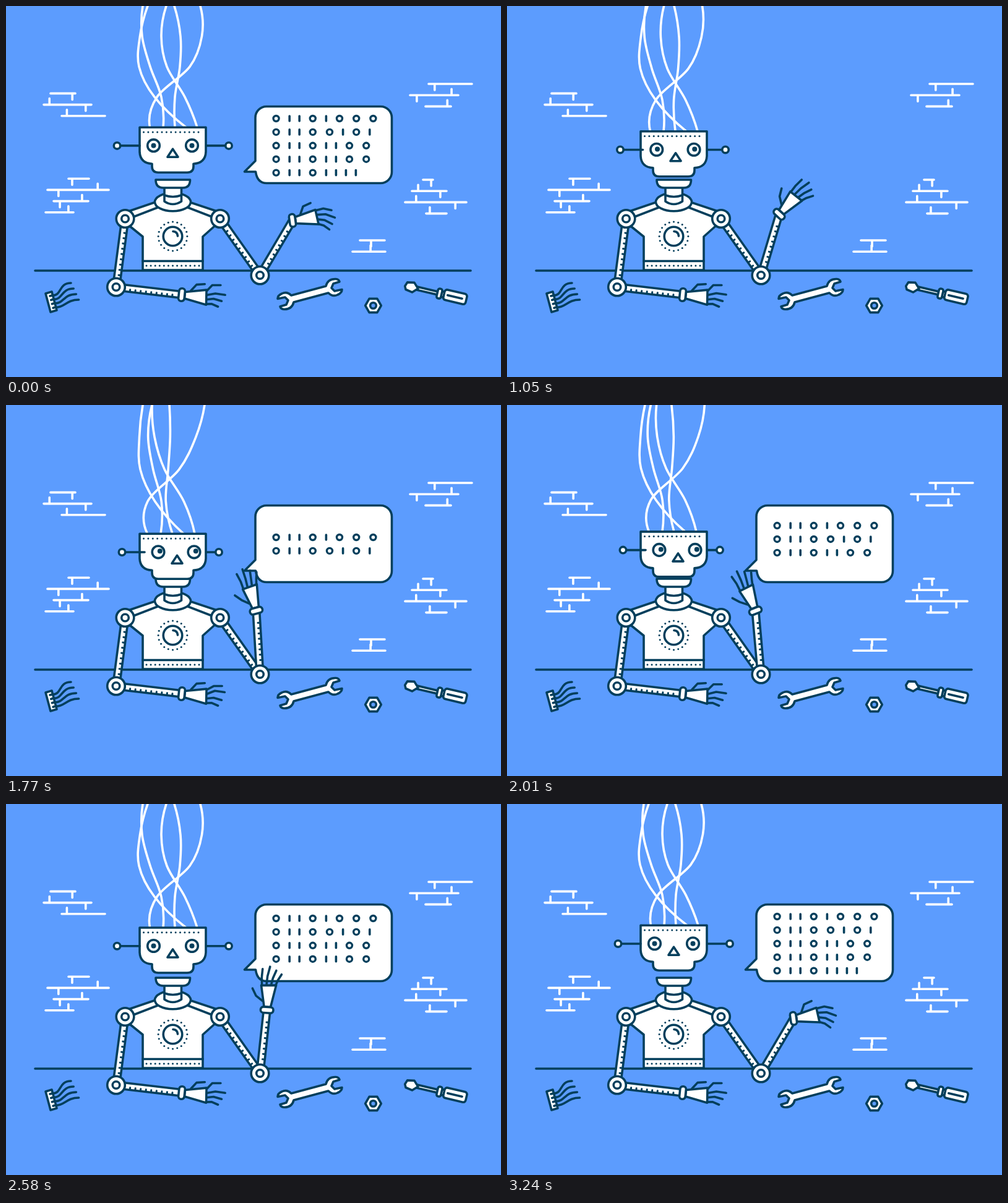
Recreate the animation shown at these times as an HTML page with a canvas. Size 800x600 px, loop 3.27 s.

```html
<!DOCTYPE html>
<html lang="en">
<head>
<meta charset="utf-8">
<title>Talking robot</title>
<style>
html, body { margin: 0; width: 100%; height: 100%; overflow: hidden; background: #5c9cfe; }
canvas { display: block; width: 800px; height: 600px; }
</style>
</head>
<body>
<canvas id="stage" width="800" height="600"></canvas>
<script>
const ctx = document.getElementById('stage').getContext('2d');
const LOOP = 3270, SKY = '#5c9cfe', INK = '#043f5c', PAPER = '#fff', LINE = 3.6;
const TAU = Math.PI * 2, RAD = Math.PI / 180;
const mix = (a, b, k) => a + (b - a) * k;
const range = n => [...Array(n).keys()];

// Smooth monotone curve through [time, value] keys.
function track(t, ...keys) {
  const last = keys.length - 1;
  if (t <= keys[0][0]) return keys[0][1];
  if (t >= keys[last][0]) return keys[last][1];
  const i = keys.findIndex(k => k[0] >= t) - 1;
  const rate = j => (keys[j + 1][1] - keys[j][1]) / (keys[j + 1][0] - keys[j][0]);
  const slope = j => {
    if (j === 0 || j === last) return 0;
    const a = rate(j - 1), b = rate(j);
    return a * b <= 0 ? 0 : 2 * a * b / (a + b);
  };
  const span = keys[i + 1][0] - keys[i][0], u = (t - keys[i][0]) / span, v = 1 - u;
  return keys[i][1] * (1 + 2 * u) * v * v + keys[i + 1][1] * (3 - 2 * u) * u * u +
    span * u * v * (slope(i) * v - slope(i + 1) * u);
}

function paint(path, fill = PAPER, stroke = INK, width = LINE) {
  ctx.lineWidth = width;
  if (fill) { ctx.fillStyle = fill; ctx.fill(path); }
  if (stroke) { ctx.strokeStyle = stroke; ctx.stroke(path); }
}
const shape = (d, fill, stroke) => paint(new Path2D(d), fill, stroke);
const lines = (d, color = INK, width = LINE) => paint(new Path2D(d), null, color, width);
function circle(x, y, r, fill, stroke, width) {
  const p = new Path2D();
  p.arc(x, y, r, 0, TAU);
  paint(p, fill, stroke, width);
}
const dot = (x, y, r = 1.5) => circle(x, y, r, INK, null);
const dotRow = (from, to, y, n) => range(n).forEach(i => dot(mix(from, to, i / (n - 1)), y));
function box(x, y, w, h, r = 0) {
  const p = new Path2D();
  p.roundRect(x, y, w, h, r);
  paint(p);
}
function polygon(points) {
  shape('M' + points.map(p => p.join(' ')).join('L') + 'Z');
}
function placed(x, y, angle, draw) {
  ctx.save();
  ctx.translate(x, y);
  ctx.rotate(angle);
  draw();
  ctx.restore();
}

// Courses are [start, end]; one joint rises at the given share of the length, one hangs opposite.
function bricks(y, joint, ...courses) {
  courses.forEach(([from, to], i) => {
    const level = y + i * 18.2;
    let d = `M${from} ${level}H${to}`;
    if (i > 0) d += `M${mix(from, to, joint)} ${level}v-10`;
    if (i < courses.length - 1) d += `M${mix(to, from, joint)} ${level}v10`;
    lines(d, PAPER);
  });
}
function drawWall() {
  bricks(141.4, .12, [72, 112], [61, 138], [90, 160]);
  bricks(126, .86, [683, 753], [653, 731], [678, 719]);
  bricks(279.2, .82, [101, 134], [67, 166], [77, 133], [64, 109]);
  bricks(281, .18, [674, 690], [656, 712], [645, 744], [679, 712]);
  bricks(379, .55, [572, 612], [560, 613]);
}

function drawTools() {
  shape('M64 465L74 462L82 492L72 495Z');
  for (const i of range(4)) {
    const x = 76 + i * 1.7, y = 468 + i * 6.4, tipX = 105 + i * 4.2, tipY = 448 + i * 9;
    lines(`M${x - 5} ${y + 1}l3 -.8M${x} ${y}C${x + 14} ${y} ${tipX - 20} ${tipY} ${tipX} ${tipY}`);
  }

  placed(491, 466, 0, () => {
    const jaw = 'Q29 -25 42 -24.5Q47 -24 48 -20L38 -17L35 -10L40 -5L52 -7.500Q52 -2 45 1Q37 5 30 -2';
    const turned = jaw.replace(/-?[\d.]+/g, n => -n);
    shape('M26 -13' + jaw + 'L-26 13' + turned + 'Z');
  });

  polygon(range(6).map(i => [593.5 + 12.8 * Math.cos(i * TAU / 6), 484.5 + 12.8 * Math.sin(i * TAU / 6)]));
  circle(593.5, 484.5, 4.8, SKY);

  placed(700, 465, 13.2 * RAD, () => {
    box(-37, -2.5, 36, 5);
    shape('M-35 0L-43 -8L-54 -6L-56.500 1L-54 6L-43 8Z');
    box(2, -4.5, 8, 9);
    box(-3, -8, 7, 16, 3);
    box(8, -9, 37, 17, 4);
    lines('M14 -.5H38');
  });
}

// A strand hangs through evenly spaced points; `pull` moves its top and `swell` its middle.
function strand(top, sway, pull, swell, ...xs) {
  const step = 1 / (xs.length - 1);
  const x = xs.map((v, i) => {
    const d = i * step;
    return v + sway * (pull * (1 - d) ** 2 + swell * 4 * d * (1 - d) - 4 * d * d);
  });
  const n = x.length - 1;
  const rise = i => i === 0 ? 2 * (x[1] - x[0]) - rise(1)
    : i === n ? 2 * (x[n] - x[n - 1]) - rise(n - 1)
    : (x[i + 1] - x[i - 1]) / 2;
  const p = new Path2D();
  p.moveTo(x[0], 0);
  for (const i of range(n)) {
    const y = top * step * i, third = top * step / 3;
    p.bezierCurveTo(x[i] + rise(i) / 3, y + third, x[i + 1] - rise(i + 1) / 3, y + 2 * third, x[i + 1], y + 3 * third);
  }
  paint(p, null, PAPER);
}
function drawWires(top, sway) {
  strand(top, sway, 7, -18, 314, 316.5, 297, 244, 232.5);
  strand(top, sway, 15, 2, 221, 220, 233, 251, 254);
  strand(top, sway, -8, -16, 272, 282, 281, 273, 273);
  strand(top, sway, -8, 5, 229, 216.5, 215, 240, 291);
  strand(top, sway, -23, 3, 259, 251, 260, 289, 309);
}

function drawBody() {
  shape('M198 332L245 316H293L341 332L337 356L318 373V427H221V373L200 356Z');
  lines('M206 341L250 324M333 341L289 324M221 412.5H318');
  dotRow(227, 312, 420, 13);
  for (const i of range(20)) dot(269.5 + 23.4 * Math.sin(i * TAU / 20), 372.5 - 23.4 * Math.cos(i * TAU / 20));
  circle(269.5, 372.5, 15.3);
  lines('M270 364.5Q277 365 277.5 372');
  placed(269.5, 317, 0, () => {
    const collar = new Path2D();
    collar.ellipse(0, 0, 29, 14.8, 0, 0, TAU);
    paint(collar);
    shape('M-13.500 -25V-1Q0 8 14 -1V-25Z');
    lines('M-13.500 -11Q0 -6 14 -11');
  });
  shape('M242 281H297.5Q297.5 294 286 294H254Q242 294 242 281Z');
}

function drawHead(top, turn, lookUp) {
  placed(0, top, 0, () => {
    const y = 29.7, rightBall = 360 - 16 * turn, leftBall = 179.5 + 8 * turn;
    lines(`M300 ${y}H${rightBall - 6}`);
    circle(rightBall, y, 5.2);
    shape('M216 0H323V40Q322 58 303 59V63Q303 73 293 73H246Q236 73 236 63V59Q217 58 216 40Z');
    lines(`M${leftBall + 6} ${y}H${216 + 8 * turn}`);
    circle(leftBall, y, 5.2);
    dotRow(222.5, 311, 7.7, 13);
    for (const x of [238.5 + 7.5 * turn, 300.5 + 3.5 * turn]) {
      circle(x, 29.5, 9.8);
      dot(x + 2.8 * turn, 29.5 - 1.5 * lookUp, 4);
    }
    const nose = 269.5 + 7 * turn;
    polygon([[nose, 35], [nose - 8.5, 48], [nose + 8.5, 48]]);
  });
}

function bar(x0, y0, x1, y1, tickSide) {
  const length = Math.hypot(x1 - x0, y1 - y0);
  placed(x0, y0, Math.atan2(y1 - y0, x1 - x0), () => {
    box(0, -5.3, length, 10.6);
    for (let x = 23; x < length - 13; x += 8.6) lines(`M${x} ${4.5 * tickSide}V${1.5 * tickSide}`, INK, 3);
  });
}
function joint(x, y) {
  circle(x, y, 14.3);
  circle(x, y, 5.8);
}

// Bone angles in degrees: thumb is [lower, upper]; the others run from index to little finger.
const RELAXED = { thumb: [-63, -17], lower: [-6, 25], upper: [20, 43] };
const SPREAD = { thumb: [-50, -40], lower: [-5, 14], upper: [-13, 17] };
const RESTING = { thumb: [-53, -10], lower: [-20, -8], upper: [-6, 18] };
const blend = (a, b, k) => Object.fromEntries(
  Object.keys(a).map(part => [part, a[part].map((v, i) => mix(v, b[part][i], k))]));

function finger(x, y, lower, lowerAngle, upper, upperAngle) {
  const bone = (length, angle) => `l${length * Math.cos(angle * RAD)} ${length * Math.sin(angle * RAD)}`;
  lines(`M${x} ${y}` + bone(lower, lowerAngle) + bone(upper, upperAngle));
}
function hand(x, y, angle, pose, bend = []) {
  placed(x, y, angle, () => {
    finger(14, -8, 13.5, pose.thumb[0], 13.3, pose.thumb[1]);
    for (const i of range(4)) {
      const k = i / 3, reach = 16 - 2.5 * Math.abs(i - 1);
      finger(40, mix(-11, 11, k), reach * .9, mix(...pose.lower, k) + (bend[i] || 0), reach, mix(...pose.upper, k));
    }
    polygon([[5, -5], [39, -12], [41, 12], [5, 5.5]]);
    box(-4.8, -10.3, 9.6, 20.6, 4.5);
  });
}

const pulse = (t, center, width) => Math.abs(t - center) < width ? Math.cos((t - center) / width * Math.PI / 2) : 0;

function drawLeftArm(t) {
  const index = pulse(t, 290, 240) + pulse(t, 1770, 260);
  const middle = pulse(t, 1560, 560);
  bar(192.5, 344, 178, 454.5, -1);
  bar(178, 454.5, 284, 467, 1);
  hand(284, 467, 6 * RAD, RESTING, [mix(-32, -14, index), -14 * middle]);
  joint(192.5, 344);
  joint(178, 454.5);
}

function drawRightArm(t) {
  const lean = track(t, [780, 30.6], [1350, -1.1], [1770, -3.4], [2290, -6.2], [2580, 6.2], [3050, 30.6]) * RAD;
  const aim = track(t, [780, 82], [1350, -7], [1770, -15], [2290, -27], [2580, 4], [3050, 82]) * RAD;
  const open = track(t, [780, 0], [1300, 1], [2300, 1], [2580, .55], [3050, 0]);
  const elbow = [410.5, 435.5];
  const wrist = [elbow[0] + 103 * Math.sin(lean), elbow[1] - 103 * Math.cos(lean)];
  bar(346, 344, ...elbow, 1);
  bar(...elbow, ...wrist, 1);
  hand(...wrist, aim - TAU / 4, blend(RELAXED, SPREAD, open));
  joint(346, 344);
  joint(...elbow);
}

const ROWS = [...'hello'].map(c => c.charCodeAt(0).toString(2).padStart(8, '0'));
const ROW_STARTS = [1150, 1480, 1850, 2060, 2660], ROW_TIME = 180;

function drawRow(bits, y) {
  let x = 423;
  for (const bit of bits) {
    const half = bit === '0' ? 13.6 : 8;
    x += half;
    if (bit === '0') circle(x, y, 4.5, null, INK, 3.4);
    else lines(`M${x} ${y - 4}V${y + 4}`);
    x += half;
  }
}

function drawBubble(t) {
  const size = track(t, [780, 1], [930, 0], [1040, 0], [1180, 1]);
  if (size < .05) return;
  const fresh = t > 985;
  const grow = fresh ? track(t, [1270, 0], [1350, .52], [1450, 1]) : 1;
  const top = mix(201, 162.5, grow), bottom = mix(268, 286.5, grow);
  const firstRow = fresh
    ? track(t, [1350, 235.5], [1480, 214], [1830, 214], [2130, 185], [2590, 185], [2680, 182])
    : 182;
  placed(385, bottom - 18.5, 0, () => {
    ctx.scale(size, size);
    ctx.translate(-385, 18.5 - bottom);
    shape(`M421 ${top}H605.5a18 18 0 0 1 18 18V${bottom - 18}a18 18 0 0 1 -18 18H421` +
      `Q406 ${bottom} 403.5 ${bottom - 18.5}H385.5L403 ${bottom - 36}V${top + 18}a18 18 0 0 1 18 -18Z`);
    ROWS.forEach((bits, i) => {
      const shown = fresh ? Math.max(0, Math.ceil((t - ROW_STARTS[i]) / ROW_TIME * 8)) : 8;
      drawRow(bits.slice(0, shown), firstRow + i * 21.9);
    });
  });
}

function draw(t) {
  ctx.fillStyle = SKY;
  ctx.fillRect(0, 0, 800, 600);
  ctx.lineCap = ctx.lineJoin = 'round';
  drawWall();
  lines('M47 428H751');
  drawTools();

  const lift = 3.8 * (1 + Math.cos(track(t, [-690, -1], [570, 1], [2580, 1], [3840, 3]) * Math.PI)) / 2;
  const top = track(t, [780, 200], [1350, 207], [1680, 208.6], [1770, 208.3], [2280, 201], [2580, 200]) -
    (t < 570 || t > 2580 ? 3.8 - Math.abs(3.8 - lift) * 0 - lift * 0 : 0) * liftShare(t);
  const sway = track(t, [780, 0], [1350, .65], [1740, 1], [2280, .35], [2560, 0]);
  const turn = track(t, [900, 0], [1230, 1], [2360, 1], [2570, 0]);
  const lookUp = track(t, [900, 0], [1230, 1], [1850, 1], [2250, 0]);
  drawWires(top, sway);
  drawBody();
  drawHead(top, turn, lookUp);
  drawLeftArm(t);
  drawBubble(t);
  drawRightArm(t);
}

// Share of the head's rise, peaking as the loop restarts.
function liftShare(t) {
  const away = t > LOOP / 2 ? t - LOOP : t;
  return track(away, [-690, 0], [10, 1], [570, 0]);
}

const begin = performance.now();
function frame() {
  draw((performance.now() - begin) % LOOP);
  requestAnimationFrame(frame);
}
frame();
</script>
</body>
</html>
```
